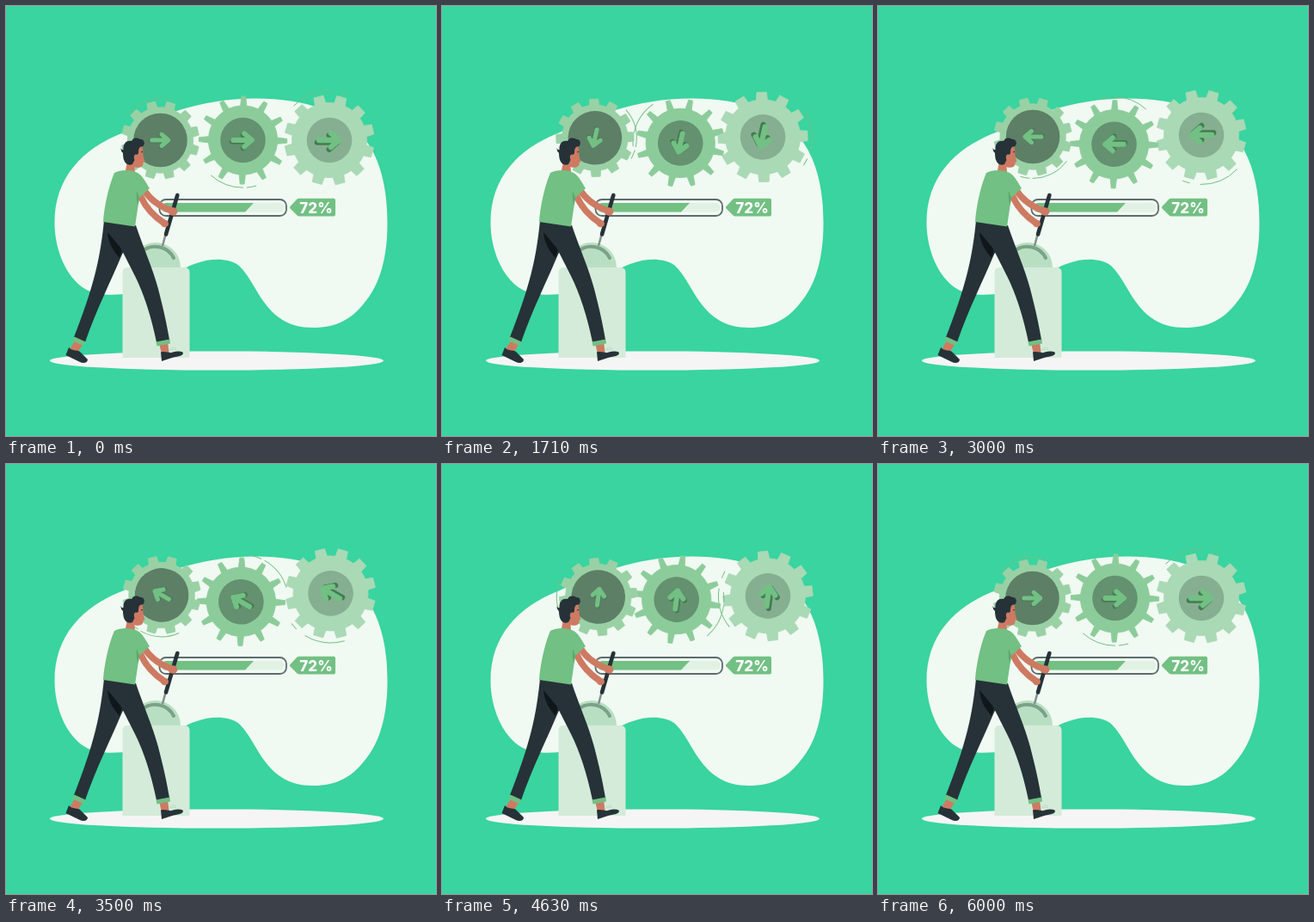
These frames come from a looping animation (500 px wide and 500 px high, 6040 ms). An HTML page:

```html
<!DOCTYPE html>
<html lang="en">
<head>
<meta charset="utf-8">
<title>Loading gears</title>
<style>
  html, body { margin: 0; width: 100%; height: 100%; overflow: hidden; background: #39d4a0; }
  svg { display: block; width: 100%; height: 100%; }
  .green { fill: #72c083; }
  .dark { fill: #263238; }
  .skin { fill: #ce7a63; }
  .arm { fill: none; stroke: #ce7a63; stroke-width: 7.5; stroke-linecap: round; }
  .orbit { fill: none; stroke: #72c083; stroke-width: 1; stroke-linecap: round; }
  .arrow { fill: none; stroke-width: 5; stroke-linecap: round; stroke-linejoin: round; }
</style>
</head>
<body>
<svg viewBox="0 0 500 500">
  <rect width="500" height="500" fill="#39d4a0"/>
  <path fill="#f0f9f2" d="M56.500 252C56.500 200 88 166 137 147C175 129 225 107.500 290 107.500C348 107.500 396 123 421 160C438 185 443.500 220 443.500 252C443.500 290 436 323 416 346C402 364 384 374 357 374C328 374 312 361 299 343C288 327 283 314 271 302C260 293 238 293 222 299C200 306 190 318 165 328C145 336 110 340 92 329C69 315 56.500 282 56.500 252Z"/>
  <ellipse cx="245" cy="412.500" rx="194" ry="11.100" fill="#f5f5f5"/>

  <g id="gears"></g>

  <g id="progress">
    <rect x="178.500" y="225" width="147.500" height="19" rx="7.500" fill="#f0f9f2" stroke="#5c6c6b" stroke-width="1.800"/>
    <rect x="181.500" y="229" width="141.500" height="10.500" rx="4.500" fill="#e1f2e5"/>
    <path class="green" d="M186 229H288L278 239.500H186Q181.500 239.500 181.500 234.500T186 229Z"/>
    <path class="green" d="M330.500 233L338.500 224.500Q339.500 223.700 341 223.700H381Q383 223.700 383 225.700V242.500Q383 244.500 381 244.500H341Q339.500 244.500 338.500 243.500L330.500 235.500Q329.500 234.200 330.500 233Z"/>
    <text x="360.500" y="240.800" text-anchor="middle" fill="#fff" font-family="Inter, 'Open Sans', sans-serif" font-size="17" font-weight="800">72%</text>
  </g>

  <g id="machine">
    <circle cx="174" cy="304" r="29" fill="#b9dfc2"/>
    <path d="M158 285.500A24 24 0 0 1 195 293" fill="none" stroke="#7ba287" stroke-width="4" stroke-linecap="round"/>
    <path d="M135.500 409V310Q135.500 304 141.500 304H207.500Q213.500 304 213.500 310V409Z" fill="#d5ebda"/>
    <path d="M186 264L182 279" stroke="#82918f" stroke-width="2.500"/>
  </g>

  <g id="man">
    <path class="arm" d="M157 222Q165 240 184 252.500"/>
    <path d="M199.300 220L186 265.500" stroke="#263238" stroke-width="4.600" stroke-linecap="round"/>
    <path class="arm" d="M160 213Q171 231 194 238.500"/>
    <ellipse class="skin" cx="194" cy="239" rx="5.500" ry="4.700"/>
    <ellipse class="skin" cx="184.500" cy="253" rx="4.500" ry="4.300"/>

    <path class="skin" d="M81 388L90 392L84 402L74 399Z"/>
    <path class="skin" d="M178 392L188 390L189.500 403L181 405Z"/>
    <path class="dark" d="M73 397C77 402 84 399 87 403L95 411C95 415 90 416 86 414L69.500 406Z"/>
    <path class="dark" d="M180 402.500C186 401 190 404.500 194 402.500C199 401 206 401 206 404C205 408 196 407.500 190 410L181 413Z"/>
    <path d="M190 399L196 396.500L198 399L191 400" fill="none" stroke="#b9dfc2"/>

    <path class="dark" d="M114 249C110 292 102 327 79 385L92 391C105 353 122 320 134 291L150 257Z"/>
    <path d="M118 263L136 280L132 293C124 284 119 275 118 263Z" fill="#0f171b"/>
    <path class="dark" d="M114 249L151 255C159 279 171 306 177 329C183 352 187 370 190 388L175 391C169 361 160 334 150 314C144 302 138 290 133 281L119 264Z"/>
    <path class="green" d="M79.500 384.500L92.500 390.500L90 395L77.500 389.500Z"/>
    <path class="green" d="M174.500 390.500L190.500 387.500L191 392.500L175.500 395.500Z"/>

    <path class="skin" d="M141 181L149 183L150 193Q145 195 139 191Z"/>
    <path class="green" d="M126 194C133 190 146 190 153 194C159 197 163 206 167 212L155 223L150 256.500L113 251C114 235 119 210 126 194Z"/>
    <path d="M155 223L153.500 232Q151 224 152 215Z" fill="#5da66e"/>
    <path class="skin" d="M147 165L158 162C160 168 159 173 160 176L161.500 181L159.500 182C160 187 156 188.500 150 187.500L143 182Z"/>
    <path class="dark" d="M136 171Q133.500 169 133.300 165Q135 168 136.500 167C136 159 141 156 146 157C148 153 154 153 156 155C161 154 162 160 159 163C155 163 154 166 154 171L150 178L147 184Q144 185.500 141 184C137 182 136 176 136 171Z"/>
    <circle class="dark" cx="151" cy="157.500" r="4"/>
    <circle class="dark" cx="157" cy="160" r="3.500"/>
    <ellipse class="skin" cx="151.500" cy="176" rx="2.700" ry="3.600"/>
    <path d="M157 170L159 169.500" stroke="#263238"/>
  </g>
</svg>
<script>
  const LOOP = 6040, TURN = 6000, FPS = 24, TEETH = 12;

  // pivot: rotation point, (x, y): wheel centre at rest, tooth: half angles at tip and root
  const GEARS = [
    { pivot: [376, 153], x: 376, y: 156, tip: 52.3, root: 43.5, tooth: [6.3, 8.5], phase: -104,
      hub: 26.3, body: '#aad9b5', core: '#86af91', shade: '#427c50', scale: 1.26, drop: 2.6,
      orbit: 57.5, arcs: [[-136, -89], [-76, -68]] },
    { pivot: [275, 158.4], x: 275.5, y: 156, tip: 51.2, root: 40.2, tooth: [2.7, 5.2], phase: -89,
      hub: 26.3, body: '#8ccc9a', core: '#64916f', shade: '#467b53', scale: 1.17, drop: 1.8,
      orbit: 55.2, arcs: [[90, 132], [74, 85]] },
    { pivot: [179.8, 154], x: 179.5, y: 156, tip: 45.3, root: 38.2, tooth: [6.3, 8.5], phase: -104,
      hub: 31.3, body: '#99d1a5', core: '#5d7f66', shade: '#4b7858', scale: 1.02, drop: 1,
      orbit: 48.5, arcs: [[-144, -90], [-85, -73]] }
  ];

  const polar = (r, deg) => {
    const a = deg * Math.PI / 180;
    return `${(r * Math.cos(a)).toFixed(2)} ${(r * Math.sin(a)).toFixed(2)}`;
  };

  function wheelPath({ tip, root, tooth: [top, base], phase }) {
    let d = '';
    for (let i = 0; i < TEETH; i++) {
      const a = phase + i * 360 / TEETH;
      d += `${i ? `A${root} ${root} 0 0 1 ` : 'M'}${polar(root, a - base)}` +
           `L${polar(tip, a - top)}L${polar(tip, a + top)}L${polar(root, a + base)}`;
    }
    return `${d}A${root} ${root} 0 0 1 ${polar(root, phase - base)}Z`;
  }

  const arcPath = (r, [from, to]) => `M${polar(r, from)}A${r} ${r} 0 0 1 ${polar(r, to)}`;

  const arrow = (g, color, dx, dy) =>
    `<path class="arrow" d="M-10 0H7M1 -6.500L8.500 0L1 6.500" stroke="${color}"
      transform="translate(${dx} ${dy}) scale(${g.scale})"/>`;

  const layer = document.getElementById('gears');
  layer.innerHTML = GEARS.map(g => `<g><g transform="translate(${g.x} ${g.y})">
    ${g.arcs.map(a => `<path class="orbit" d="${arcPath(g.orbit, a)}"/>`).join('')}
    <path d="${wheelPath(g)}" fill="${g.body}" stroke="${g.body}" stroke-width=".8" stroke-linejoin="round"/>
    <circle r="${g.hub}" fill="${g.core}"/>
    ${arrow(g, g.shade, -g.drop * 0.6, g.drop)}${arrow(g, '#72c083', 0.5, 0)}
  </g></g>`).join('');

  function render(time) {
    const step = Math.floor((time % LOOP + 5) * FPS / 1000);
    const angle = Math.min(360, step * 360000 / (FPS * TURN));
    GEARS.forEach((g, i) =>
      layer.children[i].setAttribute('transform', `rotate(${angle} ${g.pivot.join(' ')})`));
  }

  const start = performance.now();
  function tick() {
    render(performance.now() - start);
    requestAnimationFrame(tick);
  }
  tick();
</script>
</body>
</html>
```
